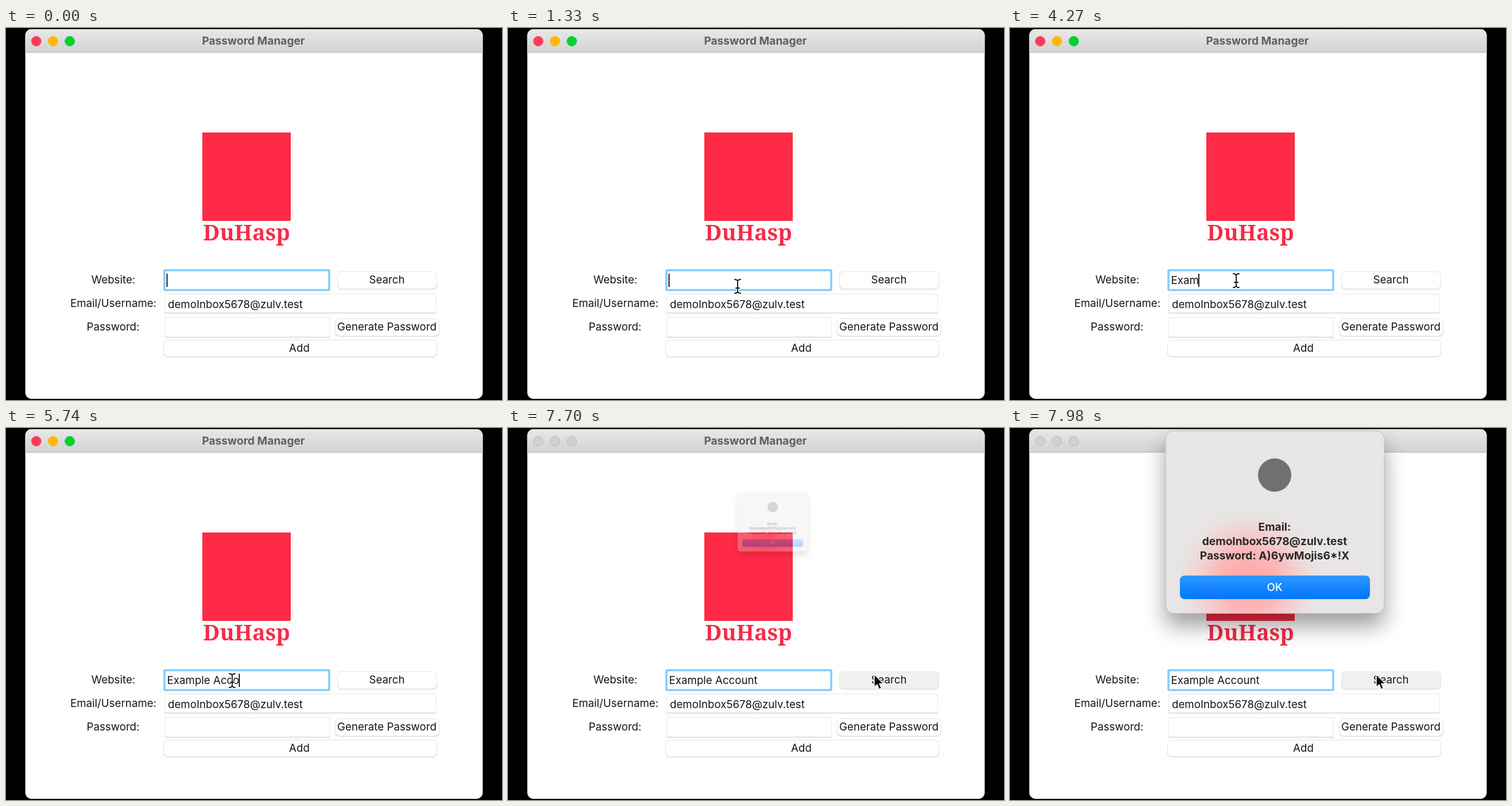
An HTML page for the animation above (8000 ms loop, 864 px wide and 648 px high).

```html
<!DOCTYPE html>
<html lang="en">
<head>
<meta charset="utf-8">
<title>Password Manager</title>
<style>
html, body { margin: 0; width: 100%; height: 100%; overflow: hidden; background: #000; }
svg { display: block; width: 864px; height: 648px; }
text { font: 18.7px Inter, sans-serif; fill: #151515; white-space: pre; }
.mid { text-anchor: middle; }
.bold { font-weight: 700; font-size: 19.1px; }
.brand { font: 700 38px "Noto Serif", serif; fill: #f42c47; }
.field { fill: #fff; stroke: #e8e8e8; }
.btn { fill: #fff; stroke: #e4e4e4; }
</style>
</head>
<body>
<svg viewBox="0 0 864 648">
  <defs>
    <linearGradient id="bar" x2="0" y2="1">
      <stop stop-color="#e9e8e9"/><stop offset="1" stop-color="#d3d2d3"/>
    </linearGradient>
    <linearGradient id="blue" x2="0" y2="1">
      <stop stop-color="#2f97ff"/><stop offset="1" stop-color="#0076fa"/>
    </linearGradient>
    <radialGradient id="glow" gradientUnits="userSpaceOnUse" cx="416" cy="266" r="132">
      <stop stop-color="#ffa6a8"/>
      <stop offset=".4" stop-color="#ffb0b1" stop-opacity=".9"/>
      <stop offset=".75" stop-color="#f6cccc" stop-opacity=".5"/>
      <stop offset="1" stop-color="#e7e5e5" stop-opacity="0"/>
    </radialGradient>
    <filter id="blur" x="-30%" y="-30%" width="160%" height="160%">
      <feGaussianBlur stdDeviation="19"/>
    </filter>
    <clipPath id="frame"><rect x="33.6" y="2" width="796.8" height="644" rx="11"/></clipPath>
    <path id="beam" d="M-5-12Q-1-12 0-9Q1-12 5-12M0-9V9M-5 12Q-1 12 0 9Q1 12 5 12M-3 3H3"/>
  </defs>
  <rect width="864" height="648"/>
  <g clip-path="url(#frame)">
    <rect x="33" y="2" width="798" height="645" fill="#fff"/>
    <rect x="33" y="2" width="798" height="41" fill="url(#bar)"/>
    <rect x="33" y="42" width="798" height="1" fill="#bdbcbd"/>
    <g id="lights"></g>
    <text class="mid bold" x="431" y="29" style="fill:#615f61">Password Manager</text>

    <rect x="342" y="182" width="154" height="154" fill="#ff2a45"/>
    <text class="mid brand" x="419" y="370">DuHasp</text>

    <g id="form"></g>
    <rect x="276" y="422" width="287" height="34.5" rx="1" fill="#fff" stroke="#82cef8" stroke-width="3.6"/>
    <text id="site" x="280.6" y="446"></text>
    <rect id="caret" y="428" width="1.8" height="23"/>

    <g id="dialog">
      <rect x="271" y="27" width="381" height="318" rx="14" opacity=".38" filter="url(#blur)"/>
      <rect x="271" y="5" width="381" height="318" rx="14" fill="#e7e5e5"/>
      <rect x="271" y="5" width="381" height="318" rx="14" fill="url(#glow)" stroke="#bcbaba"/>
      <circle cx="461" cy="82" r="29" fill="#6f7072"/>
      <g id="message"></g>
      <rect x="296" y="257" width="331" height="41" rx="8" fill="url(#blue)"/>
      <text class="mid" x="461" y="283.5" style="fill:#fff;font-weight:500">OK</text>
    </g>
  </g>
  <g id="ibeam" fill="none" stroke-linecap="round" stroke-linejoin="round">
    <use href="#beam" stroke="#fff" stroke-width="4"/>
    <use href="#beam" stroke="#111" stroke-width="1.8"/>
  </g>
  <path id="arrow" d="M0 0V22.5L5 18L8.5 26L12.5 24.3L9 16.5H16Z" fill="#0a0a0a" stroke="#fff" stroke-width="1.4" stroke-linejoin="round"/>
</svg>
<script>
const LOOP = 8000, STEP = 70;
const $ = id => document.getElementById(id);

function add(parent, tag, attrs, text) {
  const el = document.createElementNS('http://www.w3.org/2000/svg', tag);
  for (const k in attrs) el.setAttribute(k, attrs[k]);
  if (text) el.textContent = text;
  parent.appendChild(el);
  return el;
}

const form = $('form'), mail = 'demoInbox5678@zulv.test';

function label(text, x, y) {
  add(form, 'text', { class: 'mid', x, y }, text);
}

function field(x, y, w, h) {
  add(form, 'rect', { class: 'field', x: x + .5, y: y + .5, width: w - 1, height: h - 1 });
  add(form, 'rect', { x, y: y + h - 1, width: w, height: 1, fill: '#c6c6c6' });
}

function button(text, x, y, w, h, mid, base) {
  add(form, 'rect', { x, y: y + .6, width: w, height: h, rx: 8, fill: '#cdcdcd' });
  const face = add(form, 'rect', { class: 'btn', x: x + .5, y: y + .5, width: w - 1, height: h - 1, rx: 7.5 });
  label(text, mid, base);
  return face;
}

label('Website:', 187, 445);
label('Email/Username:', 187, 486);
label('Password:', 186.5, 527);
field(276, 463, 473, 34);
field(276, 504, 288, 35);
add(form, 'text', { x: 282, y: 487.5 }, mail);
const search = button('Search', 577, 424, 174, 31, 663.5, 445);
button('Generate Password', 573, 506, 182, 31, 663.5, 527);
button('Add', 274, 543, 477, 30, 511, 564);

['Email:', mail, 'Password: A)6ywMojis6*!X'].forEach((s, i) =>
  add($('message'), 'text', { class: 'mid bold', x: 461, y: 178.5 + 25 * i, style: 'fill:#2b2828' }, s));

const lamps = ['#fe3c59', '#ffb808', '#06d031'].map((color, i) =>
  ({ color, el: add($('lights'), 'circle', { cx: 52.7 + 29.2 * i, cy: 23, r: 8.4 }) }));

const SITE = 'Example Account';
const keys = [2940, 3990, 4130, 4270, 4480, 4620, 4760, 4830, 5180, 5460, 5600, 5740, 5950, 6090, 6160];
const dark = [[700, 980], [1610, 1890], [2520, 2870], [3500, 3780], [4410, 4760], [5390, 5670], [6300, 6650], [7280, LOOP]];

// time, x, y
const pointer = [[420, 500, 640], [630, 465, 560], [840, 425, 490], [1120, 402, 455], [1260, 402, 455],
  [1330, 400, 450], [1470, 394, 440], [6930, 394, 440], [7000, 452, 435], [7070, 552, 428],
  [7140, 620, 423], [7280, 635, 428], [7420, 638, 429]];
// time, scale, opacity
const popup = [[7700, .32, .28], [7770, .8, .42], [7840, 1.123, .62], [7980, 1, 1]];

function at(track, t) {
  const n = track.findIndex(k => k[0] > t);
  if (n < 0) return track[track.length - 1].slice(1);
  if (n === 0) return track[0].slice(1);
  const a = track[n - 1], b = track[n], f = (t - a[0]) / (b[0] - a[0]);
  return [1, 2].map(i => a[i] + (b[i] - a[i]) * f);
}

const show = (el, on) => el.setAttribute('visibility', on ? 'visible' : 'hidden');

function draw(ms) {
  const t = Math.floor(ms / STEP) * STEP;

  const n = keys.filter(k => k <= t).length, site = $('site');
  site.textContent = SITE.slice(0, n);
  $('caret').setAttribute('x', 279.6 + (n ? site.getComputedTextLength() : 0));
  show($('caret'), !dark.some(([a, b]) => t >= a && t < b));

  const [x, y] = at(pointer, t), typing = x < 564 && y > 420 && y < 540;
  show($('ibeam'), t >= 420 && typing);
  show($('arrow'), t >= 420 && !typing);
  for (const id of ['ibeam', 'arrow']) $(id).setAttribute('transform', `translate(${x} ${y})`);

  const blurred = t >= 7630;
  for (const { color, el } of lamps) {
    el.setAttribute('fill', blurred ? '#d2d1d2' : color);
    el.setAttribute('stroke', blurred ? '#b9b8b9' : color);
  }
  search.style.fill = t >= 7490 ? '#f0f0f0' : '#fff';

  const [s, o] = at(popup, t), dialog = $('dialog');
  show(dialog, t >= 7700);
  dialog.setAttribute('opacity', o);
  dialog.setAttribute('transform', `translate(461 164) scale(${s}) translate(-461 -164)`);
}

const start = performance.now();
function tick() {
  draw((performance.now() - start) % LOOP);
  requestAnimationFrame(tick);
}
tick();
</script>
</body>
</html>
```
